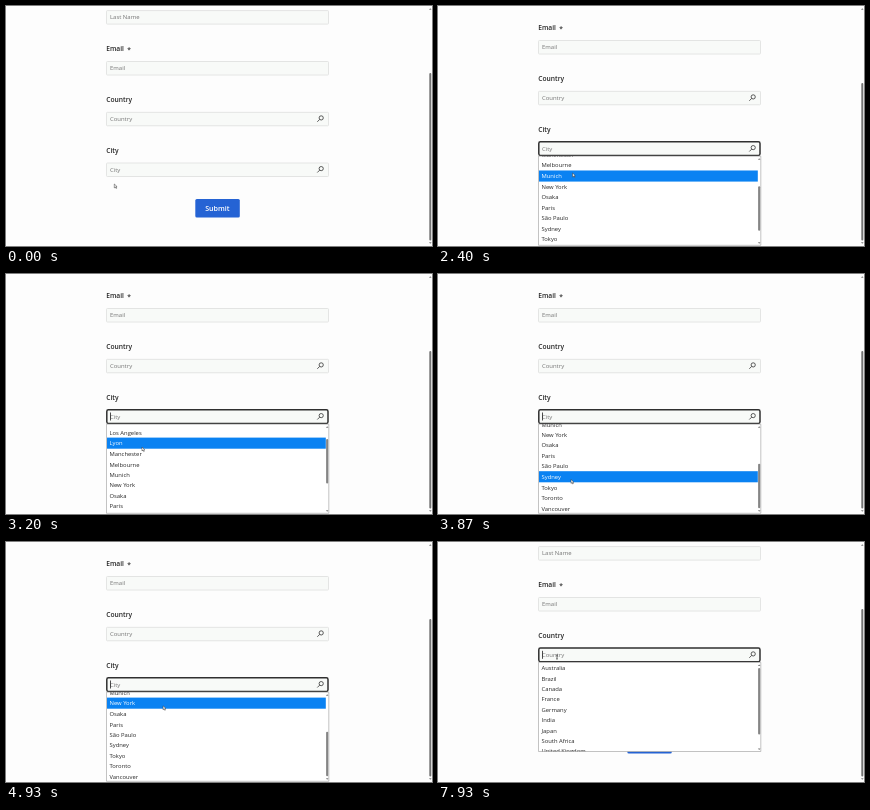
An HTML page with a canvas for the animation above (8 s loop, 426x240 px).

```html
<!DOCTYPE html>
<html lang="en">
<head>
<meta charset="utf-8">
<title>Form with searchable lists</title>
<style>
html, body { margin: 0; width: 100%; height: 100%; overflow: hidden; background: #fdfdfd; }
canvas { display: block; width: 426px; height: 240px; }
</style>
</head>
<body>
<canvas id="stage" width="426" height="240"></canvas>
<script>
const ctx = document.getElementById('stage').getContext('2d');
const LOOP = 8000;
const ROW = 10.4, ACTIVE_ROW = 11.1, LIST_HEIGHT = 89.5;
const FONT = '"Open Sans", "Noto Sans", sans-serif';
const CITIES = ['Berlin', 'London', 'Los Angeles', 'Lyon', 'Manchester', 'Melbourne', 'Munich',
  'New York', 'Osaka', 'Paris', 'São Paulo', 'Sydney', 'Tokyo', 'Toronto', 'Vancouver'];
const COUNTRIES = ['Australia', 'Brazil', 'Canada', 'France', 'Germany', 'India', 'Japan',
  'South Africa', 'United Kingdom', 'United States'];

// Each key is [time, ...values]
const POINTER = [
  [70, 108.3, 178], [270, 130, 162.5], [1130, 130, 162.5], [1400, 132, 164],
  [1930, 134, 167], [2400, 134.5, 167], [3070, 135.5, 170], [3200, 136, 173],
  [3800, 133, 205.5], [3930, 133, 205.5], [4230, 138, 225], [4400, 142, 224],
  [4730, 154, 183], [4800, 156, 178], [4870, 157, 164.5], [5200, 157.5, 161],
  [5400, 157.5, 161], [6130, 122, 92], [7270, 122, 92], [7670, 119, 115]
];
const LIST_SCROLL = [
  [1490, 0], [1530, 11], [1930, 67.7], [2200, 67.7], [2400, 48.5], [2980, 0],
  [3070, 0], [3200, 18], [3700, 67.7]
];

function sample(keys, t) {
  if (t <= keys[0][0]) return keys[0].slice(1);
  for (let i = 1; i < keys.length; i++) {
    const a = keys[i - 1], b = keys[i];
    if (t <= b[0]) {
      const k = (t - a[0]) / (b[0] - a[0]);
      return a.slice(1).map((v, j) => v + (b[j + 1] - v) * k);
    }
  }
  return keys[keys.length - 1].slice(1);
}

function rect(x, y, w, h, color) {
  ctx.fillStyle = color;
  ctx.fillRect(x, y, w, h);
}

function box(x, y, w, h, r, fill, stroke, line) {
  ctx.beginPath();
  ctx.roundRect(x, y, w, h, r);
  if (fill) { ctx.fillStyle = fill; ctx.fill(); }
  if (stroke) { ctx.strokeStyle = stroke; ctx.lineWidth = line; ctx.stroke(); }
}

function text(str, x, y, size, color, weight = 400) {
  ctx.font = `${weight} ${size}px ${FONT}`;
  ctx.fillStyle = color;
  ctx.fillText(str, x, y);
}

function triangle(x, y, dir) {
  ctx.beginPath();
  ctx.moveTo(x - 1.3, y + 0.8 * dir);
  ctx.lineTo(x + 1.3, y + 0.8 * dir);
  ctx.lineTo(x, y - 0.8 * dir);
  ctx.fillStyle = '#777';
  ctx.fill();
}

function searchIcon(x, y) {
  ctx.beginPath();
  ctx.arc(x + 0.7, y - 0.9, 2.1, 0, Math.PI * 2);
  ctx.moveTo(x - 0.8, y + 0.6);
  ctx.lineTo(x - 3.2, y + 3);
  ctx.strokeStyle = '#333';
  ctx.lineWidth = 0.8;
  ctx.stroke();
}

function field(name, y, { label = true, search = false, focus = false, caret = false } = {}) {
  if (label) text(name, 100.2, y - 16.6, 6.7, '#242424', 600);
  if (focus) box(100.8, y - 6.7, 221.2, 13.6, 1.6, '#f8faf8', '#303030', 1.5);
  else box(100.5, y - 6.5, 222, 13.5, 0.8, '#f8faf8', '#e1e3e1', 0.9);
  text(name, 104, y + 2.3, 5.95, '#737373');
  if (search) searchIcon(314.5, y);
  if (caret) rect(104, y - 4, 0.8, 8, '#222');
}

function dropdown(items, top, scroll, active, thumbTop, thumbHeight) {
  rect(100, top, 223, LIST_HEIGHT, '#fff');
  ctx.save();
  ctx.beginPath();
  ctx.rect(100, top, 223, LIST_HEIGHT);
  ctx.clip();
  let y = top + 0.5 - scroll;
  items.forEach((item, i) => {
    const on = i === active, h = on ? ACTIVE_ROW : ROW;
    if (on) rect(101, y, 218.8, h, '#0a82f2');
    text(item, 103.5, y + h / 2 + 2.2, 5.85, on ? '#fff' : '#262626');
    y += h;
  });
  ctx.restore();
  box(100.5, top + 0.2, 222.3, LIST_HEIGHT - 0.4, 0, null, '#9a9a9a', 0.6);
  triangle(321.2, top + 3, 1);
  triangle(321.2, top + 87, -1);
  box(320.1, thumbTop, 2.1, thumbHeight, 1, '#858585');
}

function pointer(x, y, beam) {
  ctx.beginPath();
  if (beam) {
    ctx.moveTo(x - 0.8, y - 2); ctx.lineTo(x + 0.8, y - 2);
    ctx.moveTo(x, y - 2); ctx.lineTo(x, y + 2);
    ctx.moveTo(x - 0.8, y + 2); ctx.lineTo(x + 0.8, y + 2);
    ctx.strokeStyle = '#333';
    ctx.lineWidth = 0.7;
    ctx.stroke();
    return;
  }
  ctx.moveTo(x, y);
  ctx.lineTo(x, y + 3.9);
  ctx.lineTo(x + 1, y + 3);
  ctx.lineTo(x + 1.7, y + 4.5);
  ctx.lineTo(x + 2.3, y + 4.2);
  ctx.lineTo(x + 1.7, y + 2.8);
  ctx.lineTo(x + 2.8, y + 2.7);
  ctx.closePath();
  ctx.fillStyle = '#fff';
  ctx.fill();
  ctx.strokeStyle = '#333';
  ctx.lineWidth = 0.5;
  ctx.stroke();
}

const caretOn = (t, start) => Math.floor(Math.max(0, t - start) / 528) % 2 === 0;

function hoveredCity(t) {
  if (t < 1130) return -1;
  const s = Math.min(t, 5600) - 40;   // hover lags slightly behind the scroll
  const y = Math.max(150.6, sample(POINTER, s)[1]);
  const row = Math.floor((y - 150.5 + sample(LIST_SCROLL, s)[0]) / ROW);
  return Math.min(CITIES.length - 1, row);
}

function draw(t) {
  const cityOpen = t >= 670 && t < 6330;
  const countryFocus = t >= 6330, countryOpen = t >= 6400;
  const scrolled = t >= 730 && t < 6330;
  const shift = scrolled ? -21 : 0;

  rect(0, 0, 426, 240, '#fdfdfd');
  field('Last Name', 11.1 + shift, { label: false });
  field('Email', 62 + shift);
  text('*', 121.3, 45.6 + shift, 6.7, '#333', 600);
  field('Country', 112.8 + shift, {
    search: true, focus: countryFocus, caret: countryFocus && caretOn(t, 6350)
  });
  field('City', 163.5 + shift, {
    search: true, focus: cityOpen, caret: cityOpen && caretOn(t, 703)
  });
  box(189.3, 193 + shift, 44.5, 18.4, 1.5, '#2563d4');
  ctx.textAlign = 'center';
  text('Submit', 211.4, 204.9 + shift, 7.1, '#fff', 600);
  ctx.textAlign = 'left';

  if (cityOpen) {
    const scroll = sample(LIST_SCROLL, t)[0], top = 171 + shift;
    dropdown(CITIES, top, scroll, hoveredCity(t), top + 6 + scroll * 0.5, 44.5);
  }
  if (countryOpen) dropdown(COUNTRIES, 120.2, 0, -1, 126, 66.5);

  triangle(424.3, 3, 1);
  triangle(424.3, 237, -1);
  const thumb = scrolled ? 77 : 67;
  box(423.3, thumb, 2, 234.5 - thumb, 1, '#747474');

  const [x, y] = sample(POINTER, t);
  const overField = (t < 670 && y < 170) ||
    (t > 5400 && t < 6330 && (y < 99 || (y > 136 && y < 149))) || (t >= 6330 && y > 106);
  pointer(x, y, overField);
}

function tick() {
  draw(performance.now() % LOOP);
  requestAnimationFrame(tick);
}
tick();
</script>
</body>
</html>
```
